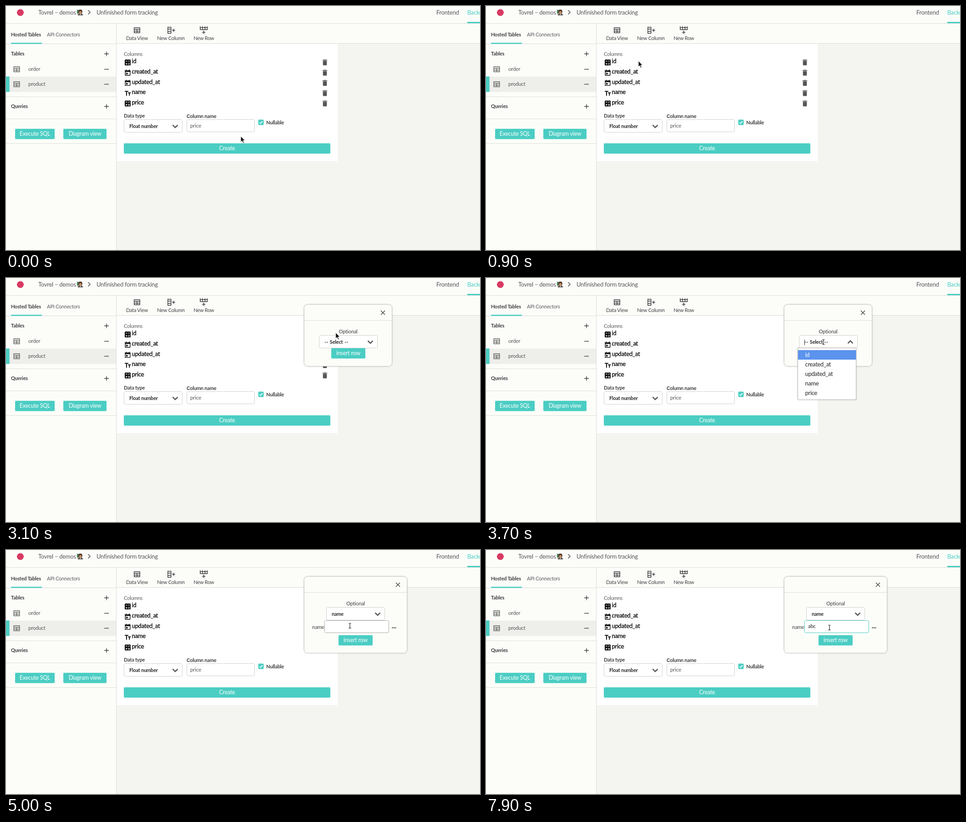
Recreate the animation shown at these times as an HTML page. Size 1042 px wide and 538 px high, loop 8 s.

```html
<!DOCTYPE html>
<html lang="en">
<head>
<meta charset="utf-8">
<title>Table editor</title>
<style>
html, body { margin: 0; width: 100%; height: 100%; overflow: hidden; background: #f4f5f1; }
svg { display: block; width: 1042px; height: 538px; }
text { font-family: Lato, "Noto Sans", sans-serif; letter-spacing: -0.02em; white-space: pre; }
</style>
</head>
<body>
<svg viewBox="0 0 1042 538">
  <defs>
    <filter id="shadow" x="-20%" y="-20%" width="140%" height="140%">
      <feDropShadow dx="0" dy="0" stdDeviation="1.5" flood-color="#000" flood-opacity=".25"/>
    </filter>
  </defs>
  <g id="base"></g>
  <g id="live"></g>
</svg>
<script>
const LOOP = 8000, STEP = 100;
const TEAL = '#4bcdc3', PINK = '#d83a64', PAPER = '#fcfdf9', LINE = '#dcddd9';
const GREY = '#55575a', DARK = '#3d3f41';
const COLUMNS = ['id', 'created_at', 'updated_at', 'name', 'price'];

// Drawing helpers; text is placed by its vertical middle.
const rect = (x, y, w, h, fill, extra = '') =>
  `<rect x="${x}" y="${y}" width="${w}" height="${h}" fill="${fill}" ${extra}/>`;
const path = (d, color, width = 1.5, extra = '') =>
  `<path d="${d}" fill="none" stroke="${color}" stroke-width="${width}" ${extra}/>`;
const shape = (d, fill) => `<path d="${d}" fill="${fill}"/>`;
const at = (x, y, body) => `<g transform="translate(${x} ${y})">${body}</g>`;
const text = (s, x, y, size, fill = GREY, extra = '') =>
  `<text x="${x}" y="${y + size * 0.35}" font-size="${size}" fill="${fill}" ${extra}>${s}</text>`;
const bold = (s, x, y, size, fill = DARK) => text(s, x, y, size, fill, 'font-weight="700"');
const mid = (s, x, y, size, fill) => text(s, x, y, size, fill, 'text-anchor="middle"');
const firm = (s, x, y, size) => text(s, x, y, size, '#111', 'stroke="#111" stroke-width=".35"');
const plus = (x, y) => path(`M${x - 5} ${y}h10M${x} ${y - 5}v10`, DARK, 1.4);
const minus = (x, y) => path(`M${x - 5} ${y}h10`, DARK, 1.4);
const button = (label, x, y, w) =>
  rect(x, y - .3, w, 22.8, TEAL, 'rx="2"') + mid(label, x + w / 2, y + 11, 12.5, '#fff');
const field = (x, y, w, h, stroke = '#cfcfcc') =>
  rect(x + .5, y + .5, w - 1, h - 1, '#fff', `rx="3" stroke="${stroke}"`);
const select = (label, x, y, open) => {
  const d = open ? 'm-5.5 3l5.5 -5.5l5.5 5.5' : 'm-5.5 -2.5l5.5 5.5l5.5 -5.5';
  return field(x, y, 129, 29) + bold(label, x + 12, y + 15.5, 11, '#2a2a2a') +
    path(`M${x + 113} ${y + 15}${d}`, '#5c5c5c', 2.5);
};

const tableIcon = (x, y, color) => at(x, y,
  path('M-6.3 -5.5h12.6v11h-12.6zM-6.3 -2h12.6M-6.3 2h12.6M0 -2v7.5', color, 1.4));

const toolIcons = [
  color => tableIcon(288, 53.5, color),
  color => path('M355.7 46.7h7v13.6h-7zM355.7 51h7M355.7 56h7M365 53.5h7M368.5 50v7', color, 1.4),
  color => path('M427 45v7.3h15.5V45M427 47.5h15.5M432 45v7M437.5 45v7M434.7 54.5v7M431.2 58h7', color, 1.5)
];
const tools = [
  { label: 'Data View', x: 288, from: 264, to: 312 },
  { label: 'New Column', x: 362.5, from: 332, to: 393 },
  { label: 'New Row', x: 435, from: 412, to: 458 }
];

const numberIcon = rect(-6.5, -6.5, 13, 13, '#111', 'rx="1.5"') +
  path('M-4.5 -3h3.6M1 -3h3.6M-4.5 3h3.6M-2.7 1.2v3.6M1 2h3.6M1 4.2h3.6', '#fff', 1.1);
const dateIcon = path('M-5.3 -4.5h10.6v10.2h-10.6z', '#111', 1.4) +
  rect(-6, -5.2, 12, 3.4, '#111') + path('M-3.3 -7v2M3.3 -7v2', '#111', 1.5) +
  rect(-3.6, .2, 3.6, 3.4, '#111');
const textIcon = path('M-6.5 -4h8M-2.5 -4v9.5M.8 -.8h6M3.8 -.8v6.3', '#111', 2);
const columnIcons = [numberIcon, dateIcon, dateIcon, textIcon, numberIcon];
const trash = rect(-4.3, -3.7, 8.6, 10, '#555', 'rx="1"') + rect(-5.3, -5.8, 10.6, 1.5, '#555') +
  rect(-2, -6.6, 4, 1, '#555');

const teacher = rect(-6.5, -5.5, 11, 8, '#4d7d60') + rect(-6.5, 2.5, 11, 1, '#b98a54') +
  '<circle cx="1" cy="-1.5" r="4.4" fill="#33251f"/><circle cx="1" cy="-.2" r="3" fill="#c98c5c"/>' +
  shape('M-5 6.5q1 -4 6 -4t6 4z', '#4a443f') + shape('M-1 2.8h4l-2 3z', '#e9e3d8');

function header() {
  return rect(0, 0, 1042, 38, PAPER) + rect(0, 38, 1042, 1, LINE) +
    `<circle cx="31.5" cy="14.5" r="7.5" fill="${PINK}"/>` +
    text('Tovrel – demos', 71, 14, 13) + at(162.5, 14, teacher) +
    path('M180.5 9.5l4.5 4.5l-4.5 4.5', GREY, 1.7) +
    text('Unfinished form tracking', 199, 14, 13) +
    text('Frontend', 946, 14, 13) + text('Backend', 1014, 14, 13, TEAL) +
    rect(1014, 35, 28, 3, TEAL);
}

function sidebar() {
  const rules = [83, 199.5, 248.5, 303].map(y => rect(0, y, 242, 1, LINE)).join('');
  return rect(0, 39, 242, 499, PAPER) + rules + rect(242, 39, 1, 499, LINE) +
    bold('Hosted Tables', 11, 63, 11) + text('API Connectors', 90, 63, 11) +
    rect(11, 81, 68, 2.5, TEAL) +
    bold('Tables', 11, 105, 11) + plus(221, 105.5) +
    rect(0, 155.5, 242, 34, '#eeefeb') + rect(0, 155.5, 7.7, 34, TEAL) +
    tableIcon(23.5, 139.5, '#666') + text('order', 49, 139, 11.6) + minus(221, 139.5) +
    tableIcon(23.5, 172.5, '#666') + text('product', 49, 172, 11.4) + minus(221, 172.5) +
    bold('Queries', 11, 221, 11) + plus(221, 221.5) +
    button('Execute SQL', 20, 271, 87) + button('Diagram view', 126, 271, 95);
}

function panel() {
  const rows = COLUMNS.map((name, i) => {
    const y = 124.5 + 22.6 * i;
    return at(267.5, y, columnIcons[i]) + firm(name, 276.5, y - 2.7, 13.1) + at(701, y, trash);
  }).join('');
  return rect(243, 39, 799, 43, PAPER) + rect(243, 82, 799, 1, LINE) +
    rect(243, 83, 486, 259, '#fff') +
    tools.map(t => mid(t.label, t.x, 71, 11, DARK)).join('') +
    text('Columns', 259, 106, 11.1) + rows +
    bold('Data type', 259, 242, 11) + select('Float number', 259, 250) +
    bold('Column name', 397, 243, 11.1) + field(397, 250, 150, 28) + text('price', 405, 264, 11.7) +
    rect(554.5, 250.5, 12, 12, TEAL, 'rx="2"') + path('M557.5 256.5l2.3 2.5l4 -5', '#fff', 1.6) +
    bold('Nullable', 572, 257, 11.1) +
    button('Create', 259, 303, 454);
}

// Pointer track: time, x, y of the hot spot.
const track = [
  [400, 516, 287], [600, 478, 250], [900, 335, 121], [1100, 299, 82], [1300, 288, 68],
  [1500, 330, 67], [1800, 434, 56], [2500, 434, 56], [2700, 580, 76], [2900, 716, 110],
  [3000, 716, 110], [3300, 742, 141], [3700, 742, 141], [4000, 757, 240], [4200, 759, 226],
  [4600, 759, 226], [5000, 756, 167], [5200, 756, 166], [5800, 755, 171]
];
function pointer(t) {
  const i = track.findIndex(p => p[0] > t);
  if (i === 0) return track[0].slice(1);
  if (i < 0) return track[track.length - 1].slice(1);
  const [t0, x0, y0] = track[i - 1], [t1, x1, y1] = track[i];
  const k = (t - t0) / (t1 - t0);
  return [x0 + (x1 - x0) * k, y0 + (y1 - y0) * k];
}

const outline = (d, fill, stroke) =>
  `<path d="${d}" fill="${fill}" stroke="${stroke}" stroke-width="1" stroke-linejoin="round"/>`;
const beam = 'M-2.5 -5.5Q0 -5.5 0 -4V4Q0 5.5 -2.5 5.5M2.5 -5.5Q0 -5.5 0 -4M0 4Q0 5.5 2.5 5.5';
const cursors = {
  arrow: outline('M0 0V13.2L3 10.5L5.2 15.5L7.4 14.5L5.2 9.7H9.3Z', '#111', '#fff'),
  hand: outline('M-1.5 1.4Q0 -.9 1.5 1.4V5.6Q5 5.2 7.6 7Q8.8 8.5 7.8 11.5L7 15.3H-.8L-5 9.6Q-5.2 7.4 -3 8.2L-1.5 9.4Z', '#fff', '#111') +
    path('M1.5 5.6v2.4M3.8 6v2.4M6 6.6v2', '#111', .9),
  beam: path(beam, '#fff', 2.6) + path(beam, '#111', 1.1)
};

const inside = (x, y, left, top, right, bottom) => x >= left && x <= right && y >= top && y <= bottom;

function cursorKind(t, x, y, tool) {
  if (tool >= 0) return 'hand';
  if (t < 2600) return 'arrow';
  if (t < 4600) {
    if (t >= 3300 && y >= 156) return 'hand';
    return inside(x, y, 690, 127, 792, 156) ? 'beam' : 'arrow';
  }
  if (inside(x, y, 700, 155, 842, 183)) return 'beam';
  return inside(x, y, 731, 188, 806, 210) ? 'hand' : 'arrow';
}

const caret = (x, y) => rect(x, y, 1, 12, '#222');

function dropdown(y) {
  const active = Math.max(0, Math.min(4, Math.floor((y - 159) / 21)));
  const items = COLUMNS.map((name, i) => {
    const on = i === active;
    return (on ? rect(686, 159 + 21 * i, 127.5, 21, '#5b93ed') : '') +
      text(name, 701.5, 169.5 + 21 * i, 12.9, on ? '#fff' : '#222');
  }).join('');
  return rect(685.5, 154.5, 128, 113.5, '#fff', 'stroke="#bdbdbb" filter="url(#shadow)"') + items;
}

function nameRow(t) {
  const focused = t >= 5500;
  const typed = 'abc'.slice(0, Math.max(0, Math.min(3, (t - 7000) / STEP)));
  const blinkOn = focused && t < 7900 && !(t >= 6000 && t < 6600);
  return text('name', 673, 170.5, 11.4, DARK) +
    field(700, 155, 142, 28, focused ? TEAL : '#a9a9a7') +
    text(typed, 708, 168.5, 11.3, '#222') +
    (blinkOn ? caret(708 + typed.length * 5.5, 163) : '') + minus(853, 171.5);
}

function popup(t, y) {
  const chosen = t >= 4600, open = t >= 3300 && !chosen;
  const w = chosen ? 226 : 193, h = chosen ? 168.5 : 136, cx = chosen ? 768.5 : 752;
  const closeX = 656 + w - 20.5;
  const caretOn = open && (t < 3800 || t >= 4400);
  const label = chosen ? 'name' : '-\u200a-\u2009 Select \u2009-\u200a-';
  return rect(655.5, 58.5, w, h, PAPER, 'rx="8" stroke="#cfd0cc" filter="url(#shadow)"') +
    rect(656, 93, w - 1, 1, LINE) +
    path(`M${closeX - 4.5} 72l9 9m0 -9l-9 9`, DARK, 1.4) +
    mid('Optional', cx, 118, 11.3, DARK) +
    select(label, Math.floor(cx) - 64, 126, open) +
    (caretOn ? caret(700, 136) : '') +
    (chosen ? nameRow(t) : '') +
    button('insert row', Math.floor(cx) - 37, chosen ? 188 : 155, 75) +
    (open ? dropdown(y) : '');
}

const live = document.getElementById('live');
document.getElementById('base').innerHTML = header() + panel() + sidebar();

function draw(t) {
  const [x, y] = pointer(t);
  const tool = t < 2600 && y >= 45 && y <= 78 ? tools.findIndex(b => x >= b.from && x <= b.to) : -1;
  live.innerHTML = toolIcons.map((icon, i) => icon(i === tool ? PINK : DARK)).join('') +
    (t >= 2200 ? popup(t, y) : '') +
    at(x, y, cursors[cursorKind(t, x, y, tool)]);
}

let start, shown = -1;
function tick(now) {
  start ??= now;
  const t = Math.floor((now - start) % LOOP / STEP) * STEP;
  if (t !== shown) draw(shown = t);
  requestAnimationFrame(tick);
}
draw(0);
requestAnimationFrame(tick);
</script>
</body>
</html>
```
